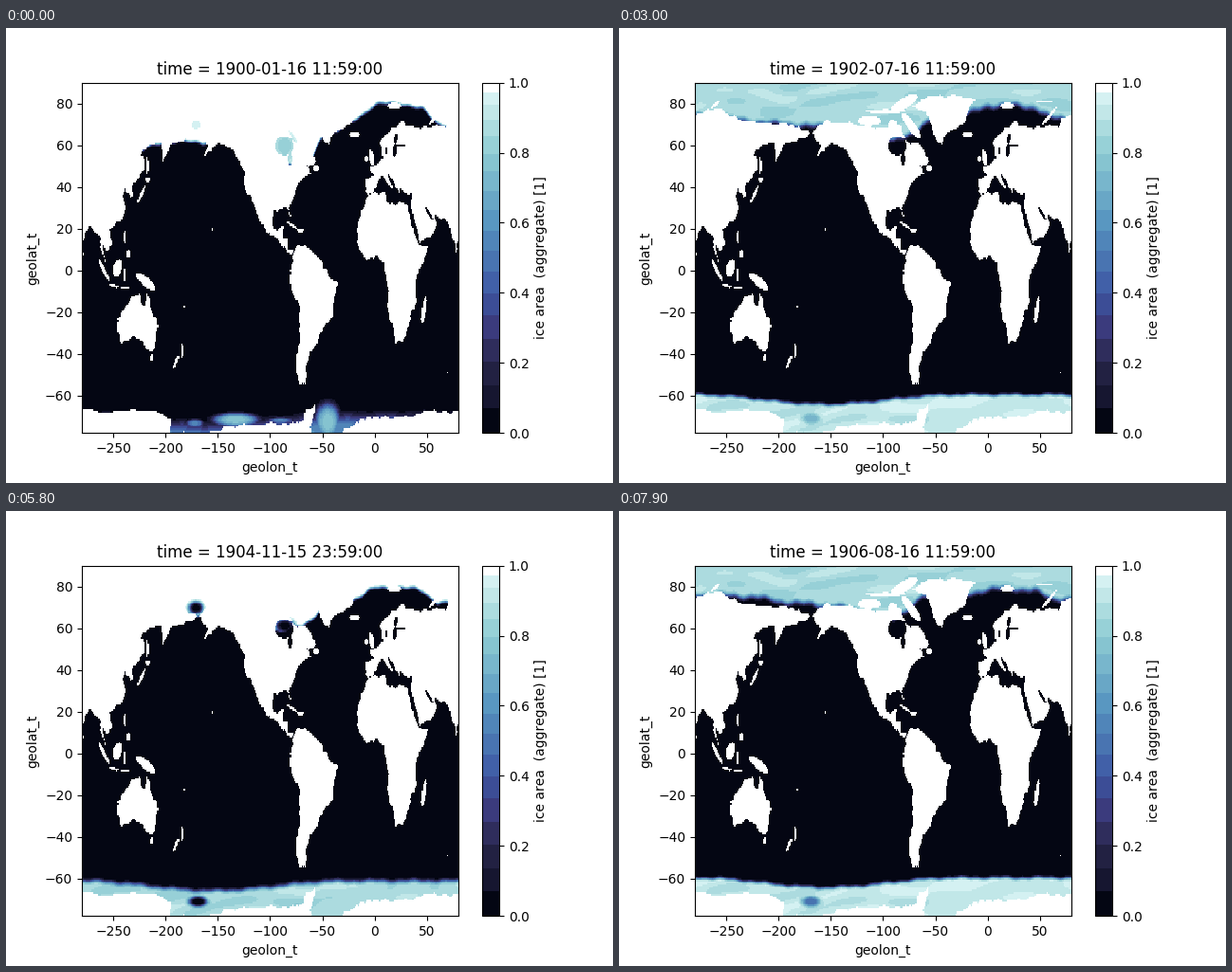
Animation, 640 px wide and 480 px high, one loop 8000 ms. Source, as a matplotlib script:

```python
import numpy as np
import matplotlib.pyplot as plt
from matplotlib.animation import FuncAnimation
from matplotlib.colors import LinearSegmentedColormap, ListedColormap
from matplotlib.path import Path

FRAMES, STEP = 80, 100
WEST, EAST, SOUTH, NORTH = -280, 80, -77.8, 90
COLS, ROWS = 360, 224

lon = WEST + (np.arange(COLS) + 0.5) * (EAST - WEST) / COLS
lat = SOUTH + (np.arange(ROWS) + 0.5) * (NORTH - SOUTH) / ROWS
LON, LAT = np.meshgrid(lon, lat)
rng = np.random.default_rng(4)

# ---- land: a few corners per continent, (longitude, latitude) ----
EURASIA = [
    (-9, 43.5), (-9, 37), (-5, 36.2), (0, 39), (4, 43.4), (9, 44.2), (16, 38),
    (18, 40.3), (20, 40), (23, 36.6), (25, 40), (28, 36.7), (36, 36.5), (35, 30),
    (43, 12.8), (52, 16), (59.5, 22.5), (57, 26), (67, 25), (72.5, 20), (77.5, 8),
    (80, 14), (88, 21.7), (94, 18), (98, 15.5), (99, 8), (103.7, 1.4), (102, 6),
    (100, 13), (105, 9), (109, 12), (106, 19), (110, 21), (117, 23.5), (122, 30),
    (119, 36), (122, 40), (126.5, 34.5), (129.5, 36), (128, 40), (140, 48),
    (140, 53), (136, 55), (143, 59.3), (156, 60.5), (157, 51), (162, 56), (165, 60),
    (179, 62.5), (190, 66), (180, 69), (160, 69.7), (130, 71.5), (113, 74),
    (104, 77.5), (87, 75), (70, 73), (68, 68.5), (44, 67.5), (28, 71), (13, 66),
    (5, 61.5), (7, 58), (8, 54), (2, 51), (-4.5, 48.4), (-1.2, 45.5)]
AFRICA = [
    (-6, 35.8), (10, 37.3), (11, 33.5), (20, 31), (23, 32.8), (32.5, 31.2), (37, 20),
    (43, 11.8), (51, 12), (47, 4.5), (39, -5), (40.5, -15), (35, -20), (32.8, -26),
    (27, -34), (19.5, -34.8), (11.8, -17), (13.7, -10), (9, 0), (9, 4.3), (3, 6.4),
    (-8, 4.4), (-16.5, 13), (-16.5, 22), (-10, 30)]
NORTH_AMERICA = [
    (-168, 65.7), (-157, 71.2), (-128, 70), (-95, 68), (-93, 72), (-82, 69.5),
    (-82, 66), (-78, 62.3), (-65, 60), (-56, 52), (-66, 50), (-61, 46), (-70, 43),
    (-76, 36), (-81, 31), (-80.4, 25.3), (-84, 30), (-97, 28.5), (-97, 20),
    (-92, 18.5), (-90, 21.2), (-87, 21.3), (-88.5, 16), (-83.5, 15), (-83, 10),
    (-78, 9), (-80, 7.3), (-86, 11), (-95, 16), (-105.5, 20), (-110, 24),
    (-117, 32.5), (-124, 40), (-124, 47), (-135, 58), (-150, 60.5), (-163, 55),
    (-159, 59), (-165, 62)]
SOUTH_AMERICA = [
    (-78, 8.5), (-72, 12), (-62, 10.5), (-51, 4), (-44, -2.7), (-35, -6), (-39, -14),
    (-41, -22.5), (-48.5, -27), (-54, -34.5), (-62, -39), (-66, -46), (-66, -55),
    (-72, -54), (-75, -47), (-71.5, -30), (-70.5, -18.5), (-76, -14), (-81, -5),
    (-80, 1)]
AUSTRALIA = [
    (114, -23), (115.5, -34.3), (124, -33.5), (131, -31.5), (138, -34), (144, -38.5),
    (150, -37.3), (153.3, -27), (146, -18.8), (142.5, -10.8), (140.5, -17.3),
    (136, -15), (136, -12), (131, -12), (126, -14.3), (122, -18)]
GREENLAND = [
    (-73, 78.3), (-60, 76), (-53, 68), (-47, 60.5), (-43, 60), (-40, 65),
    (-24, 69.5), (-19, 76), (-12, 81.5), (-30, 83.5), (-60, 82)]
ANTARCTICA = [
    (-281, -66.3), (-215, -67), (-195, -71), (-196, -79), (-160, -78.5), (-140, -75),
    (-85, -73.3), (-68, -72), (-68, -68), (-57, -63.5), (-62, -79), (-36, -78.5),
    (-18, -72.8), (0, -70), (40, -69), (57, -66.8), (73, -69), (81, -67), (81, -80),
    (-281, -80)]

# ellipses: centre, radii, tilt in degrees
EAST_ISLES = [
    (137, 36.5, 5.5, 1.2, 45), (143, 43.3, 2, 1.2, 0), (142.7, 50, 1, 4, 0),
    (175.8, -38.5, 1.3, 3.3, 0), (170, -44, 4, 1.2, 45), (146.7, -42, 1.8, 1.5, 0),
    (141, -5.5, 10, 2.4, -22), (114, 1, 4.8, 3.4, 40), (101, 0, 7.5, 1.3, -45),
    (110.5, -7.5, 4.8, .8, -8), (121, -2, 1.3, 3.3, 0), (121.3, 16, 1.1, 3, 0),
    (124.5, 7.8, 2, 1.7, 0), (121, -8.7, 4, .5, 0), (80.7, 7.6, 1, 1.7, 0),
    (178, -17.7, 1, .5, 0), (100, 79.4, 5, .9, 20)]
WEST_ISLES = [
    (-3, 54, 2, 4, 20), (-8, 53.3, 1.8, 1.6, 0), (-19, 65, 5, 1.4, 0),
    (-79, 21.6, 5.2, .7, -20), (-71, 19, 2.8, .9, 0), (-56, 48.7, 2.8, 1.6, 0),
    (47, -19, 1.8, 7, -15), (-73, 69, 11, 2.8, -32), (-113, 71.5, 11, 2.2, 0),
    (-80, 79.8, 13, 2.8, 15), (-98, 76, 19, .9, 0), (19, 78.6, 7, 1.4, 0),
    (59, 73.7, 8, 1, 30), (54, 80.7, 8, .5, 0), (69.5, -49.2, .9, .5, 0),
    (-155.6, 19.7, .9, .5, 0)]
INLAND_SEAS = [
    (-86.5, 59.5, 8.5, 4.5, 0), (-81, 53.5, 1.7, 3, 0), (-74, 62.5, 6, .8, 0),
    (19, 57.5, 2.2, 3.2, -20), (20, 63, 1.8, 2.8, -25), (25, 59.8, 4, .6, 0),
    (11, 57, 1.2, 2, 0), (16, 42.6, 4.2, 1, -45), (38, 20.7, 9, 1.5, -60),
    (52, 27, 4.5, 1.1, -40)]


def rough(shape, depth=3, size=.14):
    """Split each side at a randomly shifted midpoint, again and again."""
    pts = np.array(shape, float)
    for _ in range(depth):
        side = np.roll(pts, -1, 0) - pts
        across = side[:, ::-1] * (1, -1)
        reach = np.clip(rng.normal(0, size, (len(pts), 1)), -.2, .2)
        reach *= np.minimum(1, 5 / np.hypot(*side.T))[:, None]
        pts = np.stack([pts, pts + side / 2 + across * reach], 1).reshape(-1, 2)
    return pts


def oval(x, y, rx, ry, tilt):
    a, t = np.linspace(0, 2 * np.pi, 40), np.radians(tilt)
    u, v = rx * np.cos(a), ry * np.sin(a)
    return np.column_stack([x + u * np.cos(t) - v * np.sin(t),
                            y + u * np.sin(t) + v * np.cos(t)])


land = np.zeros(COLS * ROWS, bool)
cells = np.column_stack([LON.ravel(), LAT.ravel()])


def fill(shape, value=True):
    for shift in (0, -360):
        land[Path(shape + (shift, 0)).contains_points(cells)] = value


for shape in (EURASIA, AFRICA, NORTH_AMERICA, SOUTH_AMERICA, AUSTRALIA, ANTARCTICA):
    fill(rough(shape))
for sea in INLAND_SEAS:
    fill(oval(*sea), False)
fill(rough(GREENLAND))
for isle in EAST_ISLES + WEST_ISLES:
    fill(oval(*isle))
land = land.reshape(ROWS, COLS)

# ---- sea ice ----
# northern ice edge: longitude, latitude in late winter, latitude in late summer
KNOTS = np.array([
    (-280, 66, 76), (-222, 56, 75.5), (-200, 61, 73), (-165, 60, 71.5),
    (-145, 64, 70.5), (-90, 51, 65), (-70, 48, 72), (-62, 49, 76), (-50, 64, 75),
    (-35, 66, 72), (-18, 72, 76), (0, 79, 78.5), (25, 80, 78.5), (45, 77, 78),
    (60, 70, 74), (80, 68, 74)])
N_COLD, N_WARM = (np.interp(lon, KNOTS[:, 0], KNOTS[:, i]) for i in (1, 2))
S_COLD = -61.6 - 2.3 * np.cos((np.minimum(lon, -30) + 155) * np.pi / 125)


def blob(x, y, rx, ry):
    return np.exp(-(((LON - x) / rx) ** 2 + ((LAT - y) / ry) ** 2) ** 2)


def ramp(t):
    t = np.clip(t, 0, 1)
    return t * t * (3 - 2 * t)


def season(m, peak, power):
    """1 in the peak month, 0 half a year away."""
    return ((1 + np.cos((m - peak) * np.pi / 6)) / 2) ** power


texture = np.zeros_like(LON)
for _ in range(7):
    kx, ky, p = rng.uniform(-.07, .07), rng.uniform(.2, .7), rng.uniform(0, 6.3)
    texture += np.sin(kx * LON + ky * LAT + p + 1.5 * np.sin(LON / 21 + p)) / 7

summer_ice = .85 * np.maximum.reduce([
    blob(-133, -71.6, 22, 3.3), .7 * blob(-172, -73.3, 8, 2),
    .7 * blob(-90, -72, 12, 1.4), blob(-45, -72.5, 12, 9)])
late_freeze = np.maximum(blob(-171, 69.5, 7, 3), blob(-86, 61, 9, 3))
hudson = blob(-86, 58, 11, 8)
ross_gap = blob(-169, -71, 9, 2.6)
weddell_gap = blob(-28, -70.5, 5, 2.6)


def concentration(k):
    year, m = divmod(k, 12)
    wobble = .6 * np.sin(lon / 6 + 2 * year) + .4 * np.sin(lon / 2.3 + year)

    melt = max(0, np.cos((m - 6.5) * np.pi / 6))
    edge = N_COLD + season(m, 7.6, 1.5) * (N_WARM - N_COLD) + wobble
    north = (1 - melt * (.14 - .09 * texture)) * ramp((LAT - edge) / (2.5 + 2.5 * melt) + .5)
    north = north * (1 - season(m, 10, 12) * late_freeze)
    north = north * (1 - .18 * season(m, 1, 2) * hudson)

    warm = season(m, .6, 4)
    edge = S_COLD - 11 * warm + .5 * wobble
    south = (.93 - .4 * warm + .09 * texture) * ramp((edge - LAT) / (3 + 8 * warm) + .4)
    south = np.maximum(south, warm * summer_ice)
    south = south * (1 - ramp((m - 4) / 6) * ross_gap)
    south = south * (1 - (year == 1) * season(m, 7, 2) * weddell_gap)

    ice = np.where(LAT > 0, north, south)
    return np.ma.array(np.clip(ice, 0, 1), mask=land)


# ---- colours in bands that narrow towards 1 ----
smooth = LinearSegmentedColormap.from_list("ice", [
    (0, "#040613"), (.2, "#28264b"), (.3, "#3b3a7c"), (.4, "#3d58a4"),
    (.6, "#5795c0"), (.8, "#8dcbd3"), (.9, "#b9e3e4"), (1, "#eafcfd")])
bands = 1 - (1 - np.linspace(0, 1, 19)) ** 1.25
colours = smooth((bands[:-1] + bands[1:]) / 2)
colours[0], colours[-1] = smooth(0.), 1
cmap = ListedColormap(colours[np.searchsorted(bands, (np.arange(256) + .5) / 256) - 1])
cmap.set_bad("white")

# ---- figure ----
plt.rcParams["text.kerning_factor"] = 6
fig, ax = plt.subplots(figsize=(6.4, 4.8), dpi=100)
image = ax.imshow(concentration(0), cmap=cmap, vmin=0, vmax=1, origin="lower",
                  extent=(WEST, EAST, SOUTH, NORTH), aspect="auto",
                  interpolation="nearest")
ax.set_xlabel("geolon_t")
ax.set_ylabel("geolat_t")
fig.colorbar(image, ax=ax).set_label("ice area  (aggregate) [1]")
title = ax.set_title("")


def stamp(k):
    year, m = divmod(k, 12)
    days = 28 if m == 1 else 31 - m % 7 % 2
    day, odd = divmod(days, 2)
    clock = "11:59:00" if odd else "23:59:00"
    return f"time = {1900 + year}-{m + 1:02d}-{day + odd:02d} {clock}"


def update(k):
    image.set_data(concentration(k))
    title.set_text(stamp(k))
    return image, title


anim = FuncAnimation(fig, update, frames=FRAMES, interval=STEP, repeat=True,
                     repeat_delay=0, blit=False)
plt.show()
```
